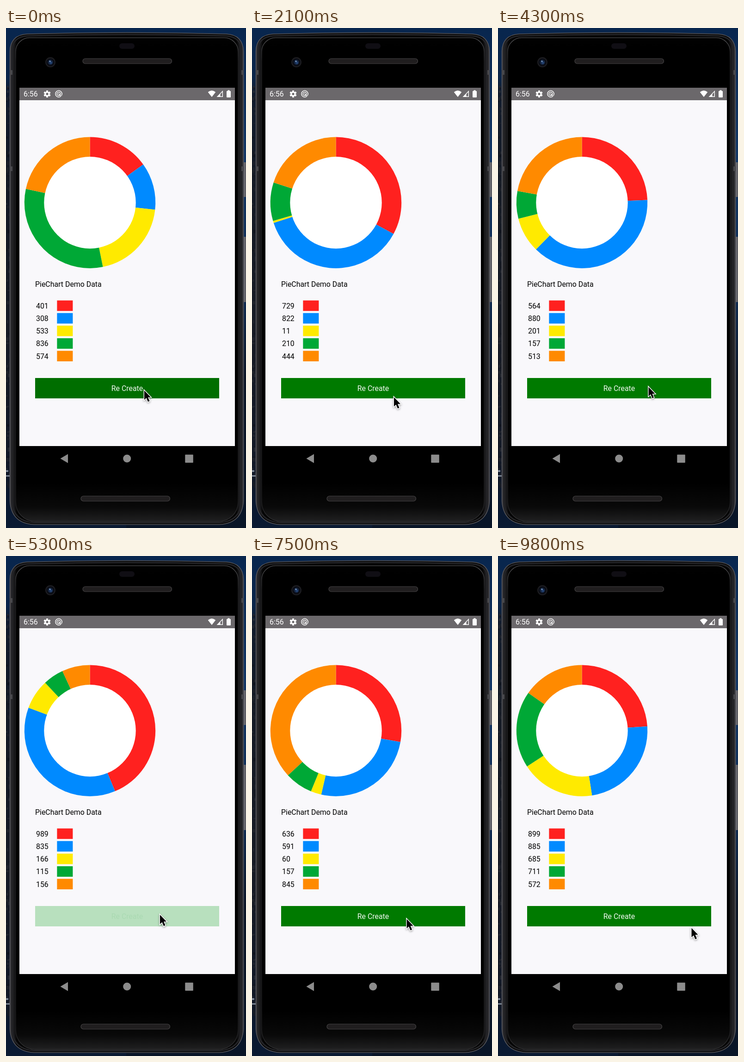
Write an HTML page with a canvas that moves like this. It is 519 px wide and 1080 px high and loops after 9900 ms.

```html
<!DOCTYPE html>
<html lang="en">
<head>
<meta charset="utf-8">
<title>Pie chart demo</title>
<style>
html, body { margin: 0; width: 100%; height: 100%; overflow: hidden; background: #081020; }
canvas { display: block; }
</style>
</head>
<body>
<canvas id="stage" width="519" height="1080"></canvas>
<script>
const stage = document.getElementById('stage');
const W = 519, H = 1080, LOOP = 9900;
const FONT = '15.9px Roboto, sans-serif';
const COLORS = ['#ff211f', '#008aff', '#ffea00', '#00a836', '#ff8a00'];

// Each data set appears when the button is released.
const DATA = [
  { at: 0, values: [401, 308, 533, 836, 574] },
  { at: 1100, values: [729, 822, 11, 210, 444] },
  { at: 3000, values: [564, 880, 201, 157, 513] },
  { at: 5300, values: [989, 835, 166, 115, 156] },
  { at: 6900, values: [636, 591, 60, 157, 845] },
  { at: 8700, values: [899, 885, 685, 711, 572] }
];
const PRESS_TIME = 350;

// Pointer stops: time, x, y
const STOPS = [
  [0, 299, 783], [1200, 299, 783], [2100, 307, 797.5], [2600, 315, 776],
  [3700, 315, 776], [4800, 333, 775], [5400, 333, 775], [6400, 318, 777],
  [6900, 318, 777], [8200, 357, 794], [8800, 357, 794], [9800, 418.5, 803.5]
];

const ease = p => p < 0.5 ? 2 * p * p : 1 - 2 * (1 - p) * (1 - p);
const clamp = v => Math.max(0, Math.min(1, v));
const mix = (a, b, p) => a + (b - a) * p;
const mixColor = (a, b, p) => `rgb(${a.map((v, i) => Math.round(mix(v, b[i], p)))})`;

function rounded(c, x, y, w, h, r, fill, stroke) {
  c.beginPath();
  c.roundRect(x, y, w, h, r);
  if (fill) { c.fillStyle = fill; c.fill(); }
  if (stroke) { c.strokeStyle = stroke; c.lineWidth = 1.2; c.stroke(); }
}

function disc(c, x, y, r, fill) {
  c.beginPath();
  c.arc(x, y, r, 0, Math.PI * 2);
  c.fillStyle = fill;
  c.fill();
}

function poly(c, points, fill) {
  c.beginPath();
  points.forEach(([x, y]) => c.lineTo(x, y));
  c.closePath();
  if (fill) { c.fillStyle = fill; c.fill(); }
}

function gradient(c, x0, y0, x1, y1, stops) {
  const g = c.createLinearGradient(x0, y0, x1, y1);
  stops.forEach(([p, color]) => g.addColorStop(p, color));
  return g;
}

function label(c, text, x, y, color, align = 'left') {
  c.font = FONT;
  c.textAlign = align;
  c.fillStyle = color;
  c.fillText(text, x, y);
}

function drawDesk(c) {
  c.fillStyle = gradient(c, 0, 0, 0, H, [
    [0, '#08264e'], [0.1, '#0b2549'], [0.13, '#111c2e'], [0.3, '#141a25'],
    [0.6, '#171b25'], [0.9, '#111827'], [0.94, '#0a1830'], [1, '#0a1a32']]);
  c.fillRect(0, 0, W, H);
  c.fillStyle = gradient(c, 0, 0, 0, H, [
    [0, '#08264e'], [0.25, '#123766'], [0.55, '#102b50'], [0.7, '#0c1626'], [1, '#091527']]);
  c.fillRect(260, 0, 259, H);
  let seed = 7;
  const rnd = () => (seed = seed * 16807 % 2147483647) / 2147483647;
  for (let i = 0; i < 130; i++) {
    const y = 125 + rnd() * 870, v = Math.round(12 + rnd() * 32);
    c.fillStyle = `rgba(${v},${v + 3},${v + 11},.7)`;
    c.fillRect(rnd() * 8, y, 2 + rnd() * 4, 2 + rnd() * 7);
  }
  c.fillStyle = '#7d8796';
  c.fillRect(0, 955, 5, 4);
  c.fillRect(0, 966, 8, 3);
}

function bodyPath(c, d) {
  const l = 8.5 + d, r = 513.5 - d, t = 13 + d, b = 1072.5 - d;
  c.beginPath();
  c.moveTo(l, 50);
  c.quadraticCurveTo(l + 1, t + 2, 46, t);
  c.quadraticCurveTo(261, t - 6, 476, t);
  c.quadraticCurveTo(r - 1, t + 2, r, 50);
  c.lineTo(r, 1022);
  c.quadraticCurveTo(r - 3, b - 3, 462, b);
  c.lineTo(60, b);
  c.quadraticCurveTo(l + 3, b - 3, l, 1022);
  c.closePath();
}

function drawPhone(c) {
  [[290, 75], [451, 141]].forEach(([y, h]) => {
    c.fillStyle = gradient(c, 513, 0, 519, 0, [[0, '#303036'], [0.5, '#77777d'], [1, '#4c4c52']]);
    c.fillRect(513, y, 6, h);
  });
  bodyPath(c, 0);
  c.fillStyle = gradient(c, 8, 0, 514, 0, [
    [0, '#4a4a4e'], [0.008, '#252528'], [0.02, '#19191b'], [0.03, '#050505'],
    [0.97, '#050505'], [0.984, '#202023'], [0.994, '#29292c'], [1, '#4c4c50']]);
  c.fill();
  c.strokeStyle = '#55555a';
  c.lineWidth = 1.6;
  c.stroke();
  bodyPath(c, 4);
  c.strokeStyle = '#242427';
  c.lineWidth = 3;
  c.stroke();

  [[91, 10], [299, 10]].forEach(([y, h]) => {
    c.fillStyle = '#48484c';
    c.fillRect(8, y, 6, h);
    c.fillRect(509, y, 5, h);
  });

  rounded(c, 21, 21, 481, 1045, [30, 30, 42, 42],
    gradient(c, 0, 21, 0, 1066, [[0, '#020202'], [0.02, '#000'], [0.92, '#000'], [0.97, '#090909'], [1, '#202021']]),
    gradient(c, 0, 21, 0, 1066, [[0, '#58585b'], [0.05, '#252527'], [0.95, '#1e1e20'], [1, '#39393b']]));

  rounded(c, 245, 33, 33, 12, 6, '#100e14');
  [[166, 66], [162, 1011]].forEach(([x, y]) => {
    rounded(c, x, y, 192.5, 11, 5.5, '#201e1f', '#454344');
  });

  disc(c, 96, 74, 11, '#1c1c20');
  disc(c, 96, 74, 8.6, '#090b12');
  disc(c, 96, 74, 5.8, '#14233e');
  disc(c, 97, 75, 3, '#22406e');
  disc(c, 95, 72, 1.4, '#8fb0d8');
}

function drawStatus(c) {
  c.fillStyle = '#6b686b';
  c.fillRect(29, 129, 466, 27);
  label(c, '6:56', 38, 148.3, '#fff');

  c.save();
  c.translate(89, 142.5);
  for (let i = 0; i < 6; i++) {
    c.rotate(Math.PI / 3);
    c.fillStyle = '#fff';
    c.fillRect(-2, -7.6, 4, 5);
  }
  disc(c, 0, 0, 5.5, '#fff');
  disc(c, 0, 0, 2.5, '#6b686b');
  c.restore();

  c.strokeStyle = '#fff';
  c.lineWidth = 1.5;
  [[7, 0.9, 6.9], [3.8, 0, 6.3]].forEach(([r, a, b]) => {
    c.beginPath();
    c.arc(114, 142.3, r, a, b);
    c.stroke();
  });
  c.beginPath();
  c.moveTo(113, 141.3);
  c.lineTo(119, 147.5);
  c.stroke();

  c.fillStyle = '#fff';
  c.beginPath();
  c.moveTo(445, 149);
  c.lineTo(436.7, 138.6);
  c.quadraticCurveTo(445, 131.6, 453.3, 138.6);
  c.fill();
  poly(c, [[455.5, 149], [469, 149], [469, 135]], '#fff');
  poly(c, [[463.5, 147.6], [467.6, 147.6], [467.6, 138.4], [463.5, 142.7]], '#6b686b');
  rounded(c, 477, 136, 9, 14, 1.2, '#fff');
  c.fillRect(479.5, 134.3, 4, 3);
}

function drawScreen(c) {
  c.fillStyle = '#f9f8fb';
  c.fillRect(29, 156, 466, 747);
  drawStatus(c);
  c.fillStyle = '#000';
  c.fillRect(29, 903, 466, 60);
  poly(c, [[117.5, 930], [134, 920.3], [134, 939.8]], '#8c8c8c');
  disc(c, 261.7, 930, 8.5, '#8c8c8c');
  rounded(c, 387.3, 921.5, 17.5, 17.5, 1, '#8c8c8c');
  label(c, 'PieChart Demo Data', 63, 558.8, '#000');
}

function drawChart(c, values) {
  const cx = 181.5, cy = 377.2, R = 141.7;
  const total = values.reduce((a, b) => a + b);
  let angle = -Math.PI / 2;
  values.forEach((v, i) => {
    const end = angle + v / total * Math.PI * 2;
    c.beginPath();
    c.moveTo(cx, cy);
    c.arc(cx, cy, R, angle, end);
    c.fillStyle = COLORS[i];
    c.fill();
    angle = end;

    const y = 588.5 + i * 27.2;
    label(c, v, 65, y + 17.3, '#000');
    c.fillStyle = COLORS[i];
    c.fillRect(110.4, y, 34, 22.7);
  });
  disc(c, cx, cy, 99.2, '#fff');
}

// 0 at rest, 1 fully dimmed
function pressLevel(t) {
  let level = 0;
  DATA.slice(1).forEach(({ at }) => {
    const down = ease(clamp((t - at + PRESS_TIME) / 150));
    const up = ease(clamp((t - at) / 250));
    level = Math.max(level, down * (1 - up));
  });
  return level;
}

function drawButton(c, t) {
  const rest = t < 750 ? [0, 110, 0] : [0, 122, 0];
  const mid = [29, 163, 64], dim = [184, 224, 190];
  const k = pressLevel(t), knee = 0.222;
  const fade = (a, b, d) => k < knee
    ? mixColor(a, b, k / knee)
    : mixColor(b, d, (k - knee) / (1 - knee));
  c.fillStyle = fade(rest, mid, dim);
  c.fillRect(63, 756, 398, 44);
  label(c, 'Re Create', 262, 784.4, fade([240, 248, 240], [184, 224, 190], [170, 217, 178]), 'center');
}

function drawPointer(c, t) {
  const i = Math.max(1, STOPS.findIndex(s => s[0] > t));
  const last = STOPS[STOPS.length - 1];
  const [a, b] = t >= last[0] ? [last, last] : [STOPS[i - 1], STOPS[i]];
  const p = a === b ? 0 : ease((t - a[0]) / (b[0] - a[0]));
  c.save();
  c.translate(mix(a[1], b[1], p), mix(a[2], b[2], p));
  poly(c, [[0, 0], [0, 20], [4.5, 15.9], [8, 24.3], [11.5, 22.8], [8, 14.7], [14, 14.5]]);
  c.lineJoin = 'miter';
  c.lineWidth = 2.8;
  c.strokeStyle = '#fff';
  c.shadowColor = 'rgba(0,0,0,.4)';
  c.shadowBlur = 4;
  c.shadowOffsetY = 1.5;
  c.stroke();
  c.shadowColor = 'transparent';
  c.fillStyle = '#000';
  c.fill();
  c.restore();
}

const backdrop = document.createElement('canvas');
backdrop.width = W;
backdrop.height = H;
const back = backdrop.getContext('2d');
[drawDesk, drawPhone, drawScreen].forEach(draw => draw(back));

const ctx = stage.getContext('2d');
const start = performance.now();

function frame() {
  const t = Math.floor((performance.now() - start) % LOOP / 100) * 100;
  ctx.drawImage(backdrop, 0, 0);
  drawChart(ctx, DATA.filter(d => d.at <= t).pop().values);
  drawButton(ctx, t);
  drawPointer(ctx, t);
  requestAnimationFrame(frame);
}
frame();
</script>
</body>
</html>
```
